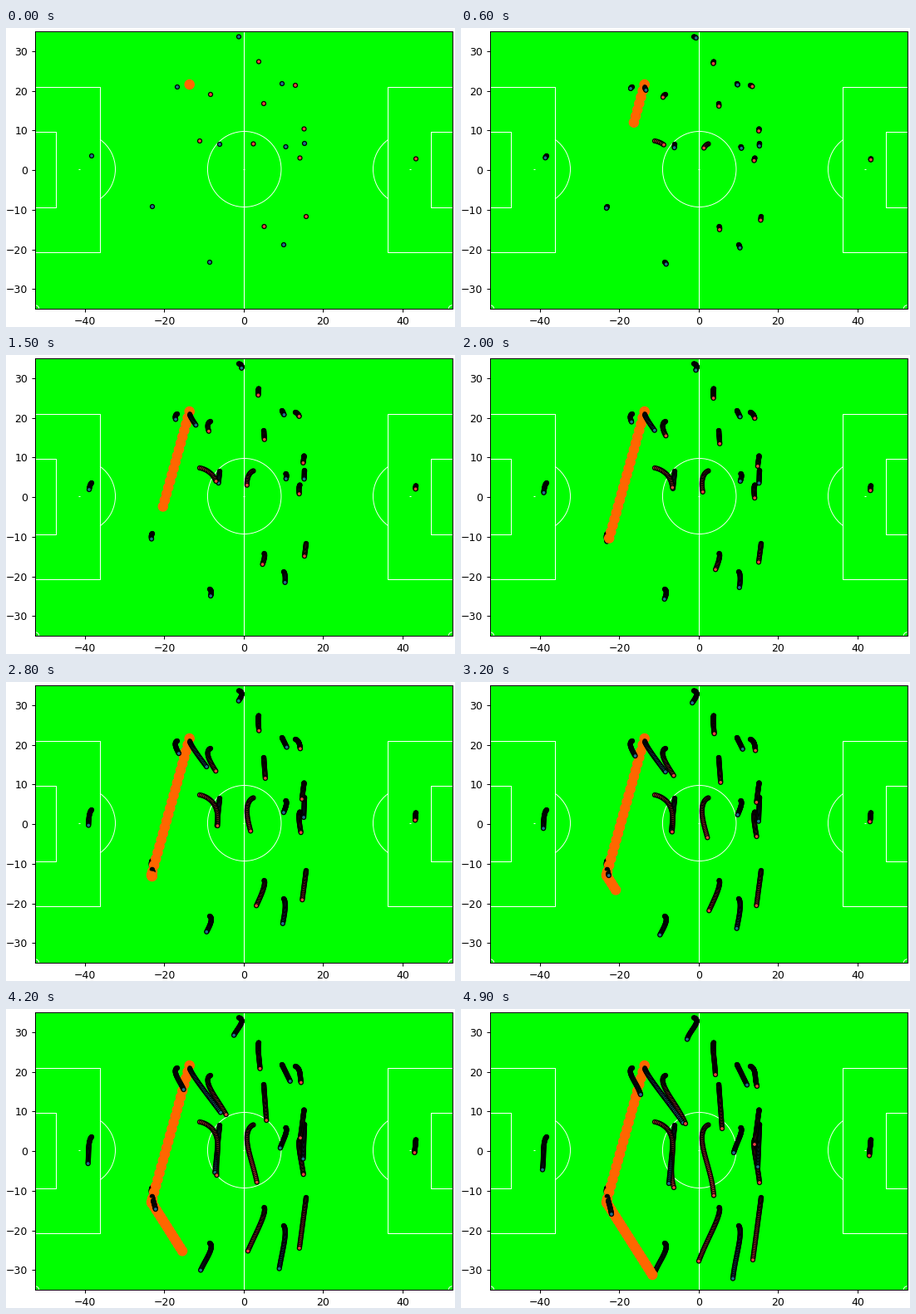
Animation, 540 px wide and 360 px high, one loop 5000 ms. Source, as a matplotlib script:

```python
import matplotlib.pyplot as plt
import numpy as np
from matplotlib.animation import FuncAnimation
from matplotlib.patches import Arc, Ellipse, Rectangle

W, H, DPI = 540, 360, 90
FRAMES, INTERVAL = 50, 100
LEFT, RIGHT, TOP, BOTTOM = 35.2, 536.7, 4.0, 338.3
MID_X, MID_Y = 286, 170
BLUE, RED, BALL = "#1f6f8b", "#e8413c", "#ff6600"
PLAYER_SIZE, BALL_SIZE = 4, 9  # marker diameters in points

plt.rcParams["font.family"] = "DejaVu Sans"
plt.rcParams["font.size"] = 10

# One run per player: start x, y, end x, y and sideways bend, in pixels
BLUE_RUNS = [
    (280, 10.5, 272, 36.5, 5), (332, 67, 344, 91.5, 0), (221, 71, 267, 137, -2),
    (206, 71, 216, 103, -4), (257, 140, 250, 210, 0), (359, 139, 357, 190, 0),
    (336.5, 143, 328, 173, 2), (103, 154, 98, 193.5, -2), (176, 215, 181, 247, -2),
    (245, 282, 231, 322, 4), (334, 261, 327, 324.5, 3),
]
RED_RUNS = [
    (304, 40.5, 306, 79, -1), (348, 69, 356, 93, 3), (310, 91, 314, 144, 0),
    (246, 80, 270, 138, -7), (233, 136, 256, 215, 15), (297.5, 139.5, 304, 224.5, -9),
    (358.5, 121.5, 353, 163, 0), (353.5, 156.5, 359, 209, -2),
    (493, 157.5, 491, 176.5, 0), (361, 227, 351, 302, 0), (310.5, 239, 286, 303.5, 3),
]


def run_position(runs, step):
    """Speed up from rest towards the end, bending sideways early on."""
    x0, y0, x1, y1, bend = np.transpose(runs)
    p = step / (FRAMES - 1)
    ease = p ** 1.35
    curve = 6.75 * p * (1 - p) ** 2
    return np.column_stack([x0 + (x1 - x0) * ease + bend * curve,
                            y0 + (y1 - y0) * ease])


def ball_position(step):
    """A straight pass, a short stop at a player's feet, a second pass."""
    times = [0, 21.5, 28, FRAMES - 1]
    return (np.interp(step, times, [220.7, 175, 175.7, 230.2]),
            np.interp(step, times, [68, 232, 234, 320]))


def draw_pitch(ax):
    def line(xs, ys):
        ax.plot(xs, ys, color="white", lw=0.8, solid_capstyle="butt", zorder=1)

    def curve(shape, x, y, width, height, **kwargs):
        ax.add_patch(shape((x, y), width, height, fill=False, ec="white",
                           lw=0.75, zorder=1, **kwargs))

    ax.add_patch(Rectangle((LEFT, TOP), RIGHT - LEFT, BOTTOM - TOP,
                           fc="#00ff00", lw=0, zorder=0))
    line([MID_X, MID_X], [TOP, BOTTOM])
    line([MID_X - 1, MID_X + 1], [MID_Y, MID_Y])
    curve(Ellipse, MID_X + 0.7, MID_Y, 88.5, 91)
    for goal, box, area, spot, turn in [(LEFT, 113, 60, 87.5, 0),
                                        (RIGHT, 459, 511, 485.5, 180)]:
        for edge, half in [(box, 99.5), (area, 45.5)]:
            top, bottom = MID_Y + 0.5 - half, MID_Y + 0.5 + half
            line([goal, edge, edge, goal], [top, top, bottom, bottom])
        line([spot - 1, spot + 1], [MID_Y, MID_Y])
        curve(Arc, spot, MID_Y, 88, 88, angle=turn, theta1=-54.5, theta2=54.5)
        corner = 270 - turn / 2
        curve(Arc, goal, BOTTOM, 9, 9, theta1=corner, theta2=corner + 90)


fig = plt.figure(figsize=(W / DPI, H / DPI), dpi=DPI, facecolor="white")

stage = fig.add_axes([0, 0, 1, 1], zorder=0)
stage.set_xlim(0, W)
stage.set_ylim(H, 0)
stage.axis("off")
draw_pitch(stage)

frame_ax = fig.add_axes([LEFT / W, 1 - BOTTOM / H, (RIGHT - LEFT) / W,
                         (BOTTOM - TOP) / H], facecolor="none", zorder=1)
frame_ax.set_xlim(-52.5, 52.5)
frame_ax.set_ylim(-35, 35)
frame_ax.set_xticks(range(-40, 41, 20))
frame_ax.set_yticks(range(-30, 31, 10))

# Every step adds the players and then the ball on top of all earlier marks
runs = BLUE_RUNS + RED_RUNS
marks = np.vstack([np.vstack([run_position(runs, step), ball_position(step)])
                   for step in range(FRAMES)])
per_step = len(runs) + 1

faces = [BLUE] * len(BLUE_RUNS) + [RED] * len(RED_RUNS) + [BALL]
edges = ["black"] * len(runs) + [BALL]
sizes = [PLAYER_SIZE ** 2] * len(runs) + [BALL_SIZE ** 2]
trail = stage.scatter(marks[:, 0], marks[:, 1], s=sizes * FRAMES,
                      c=faces * FRAMES, edgecolors=edges * FRAMES,
                      linewidths=1, zorder=3)


def update(step):
    trail.set_offsets(marks[:(step + 1) * per_step])
    return (trail,)


anim = FuncAnimation(fig, update, frames=FRAMES, interval=INTERVAL,
                     repeat=True, repeat_delay=0, blit=False)
plt.show()
```
